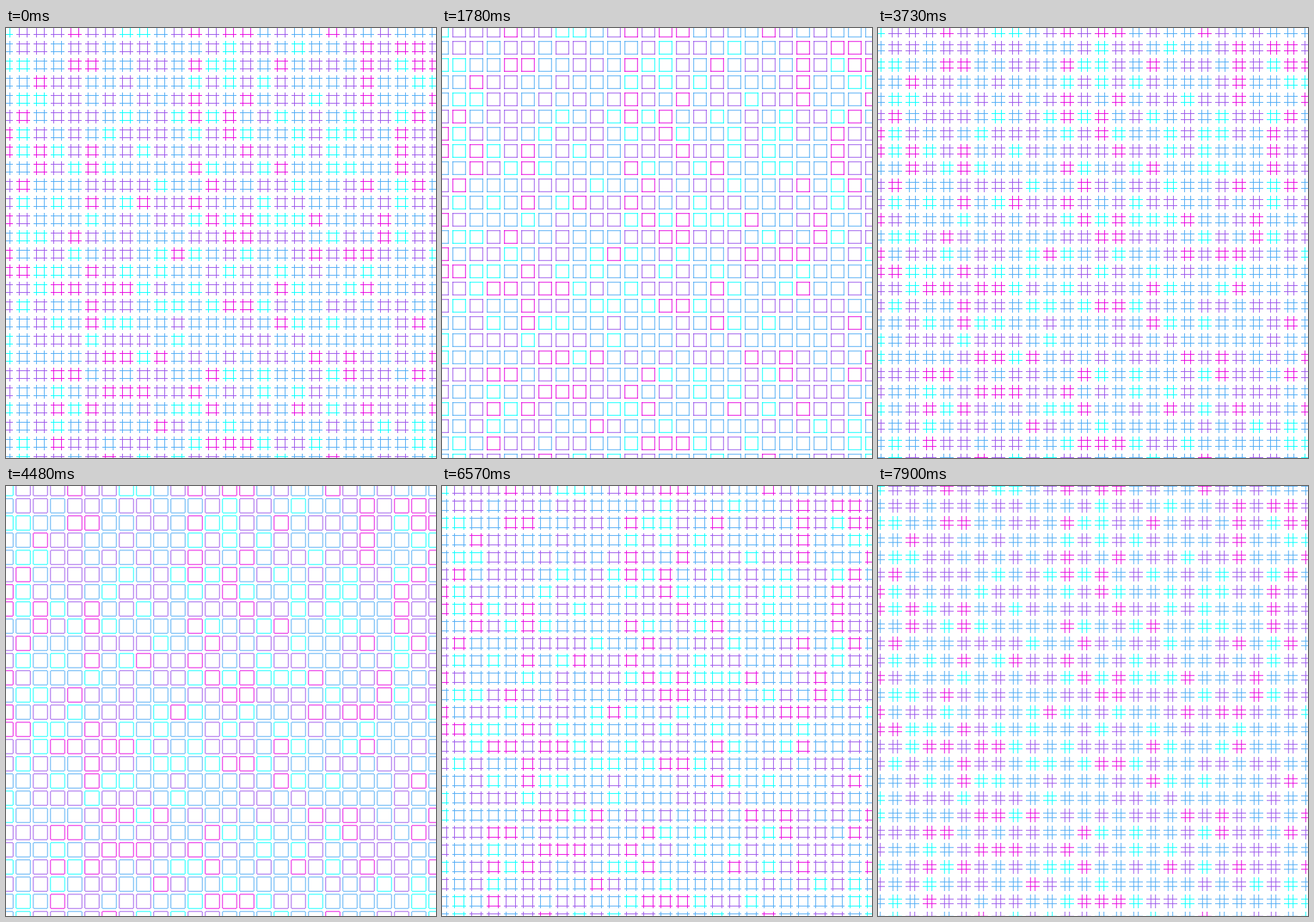
An HTML page with a canvas that plays this animation: 500x500 px, repeating every 8 s.

```html
<!DOCTYPE html>
<html lang="en">
<head>
<meta charset="utf-8">
<title>Hash grid</title>
<style>
  html, body { margin: 0; width: 100%; height: 100%; overflow: hidden; background: #fff; }
  canvas { display: block; width: 100vw; height: 100vh; }
</style>
</head>
<body>
<canvas id="stage" width="500" height="500"></canvas>
<script>
const ctx = document.getElementById('stage').getContext('2d');

const SIZE = 500, COUNT = 26, PITCH = 20, TOP = 3;
const HALF_LENGTH = 8, OPACITY = 0.85;
const LOOP = 8000, STEP = 149.06, LEAD = 10;
const PERIOD = 2535, CLOSED_AT = 675;
const MIN_SPREAD = 0.3, SPEED = 0.0063;

function seededRandom(seed) {
  return () => (seed = (seed * 16807) % 2147483647) / 2147483647;
}

// Cyan at 0, magenta at 1.
function mix(t) {
  return `rgb(${Math.round(230 * t)}, ${Math.round(255 * (1 - t))}, ${Math.round(255 - 30 * t)})`;
}

const random = seededRandom(4711);
const cells = Array.from({ length: COUNT * COUNT }, (_, i) => ({
  x: (i % COUNT) * PITCH,
  y: TOP + Math.floor(i / COUNT) * PITCH,
  color: mix(Math.round(3 * random()) / 3)
}));

function stepped(time) {
  return Math.floor((time + LEAD) / STEP) * STEP;
}

// Distance of each line from its cell centre: out and back at constant speed.
function spread(time) {
  const phase = (time - CLOSED_AT + PERIOD) % PERIOD;
  return MIN_SPREAD + SPEED * Math.min(phase, PERIOD - phase);
}

function draw(time) {
  const d = spread(time);
  ctx.clearRect(0, 0, SIZE, SIZE);
  ctx.globalAlpha = OPACITY;
  for (const { x, y, color } of cells) {
    ctx.fillStyle = color;
    for (const offset of [-d, d]) {
      ctx.fillRect(x + offset - 0.5, y - HALF_LENGTH, 1, 2 * HALF_LENGTH);
      ctx.fillRect(x - HALF_LENGTH, y + offset - 0.5, 2 * HALF_LENGTH, 1);
    }
  }
}

const begin = performance.now();
function tick() {
  draw(stepped((performance.now() - begin) % LOOP));
  requestAnimationFrame(tick);
}
tick();
</script>
</body>
</html>
```
